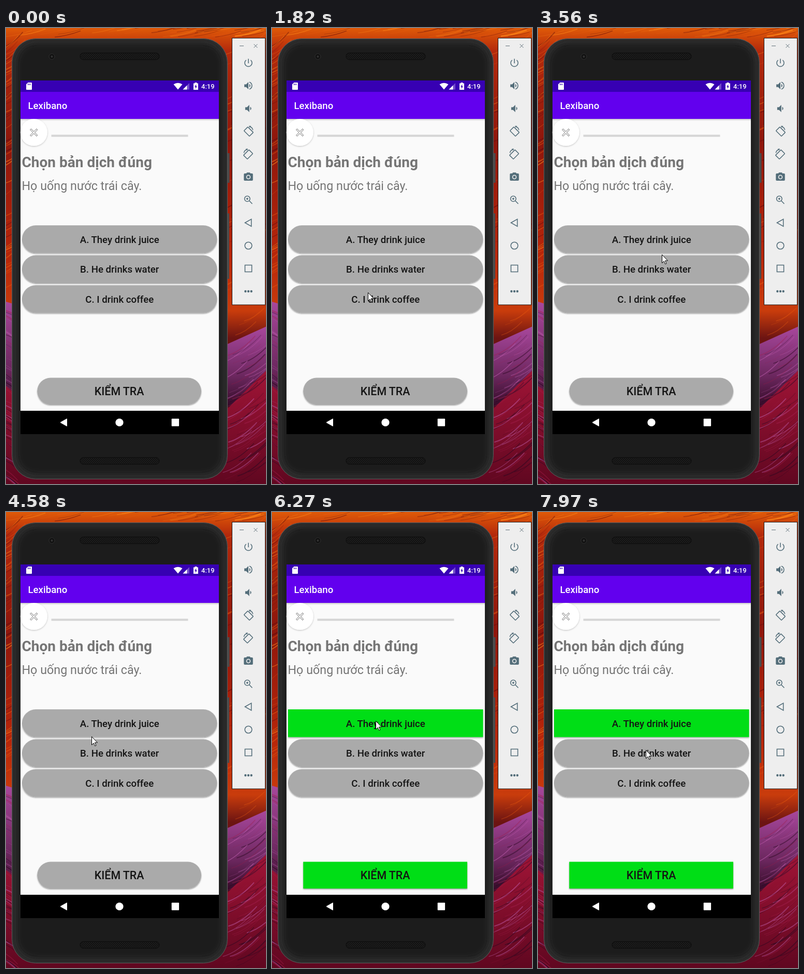
Write an HTML page that moves like this. It is 502x878 px and loops after 8000 ms.

```html
<!DOCTYPE html>
<html lang="vi">
<head>
<meta charset="utf-8">
<title>Quiz app</title>
<style>
html, body { margin: 0; width: 100%; height: 100%; overflow: hidden; background: #000; }
svg { display: block; width: 502px; height: 878px; }
text { font-family: Roboto, sans-serif; }
.mid { text-anchor: middle; font-weight: 500; fill: #141414; }
</style>
</head>
<body>
<svg viewBox="0 0 502 878" xmlns="http://www.w3.org/2000/svg">
  <defs>
    <linearGradient id="rock" x2="0" y2="1">
      <stop offset="0" stop-color="#e05a08"/><stop offset=".05" stop-color="#b42a0c"/>
      <stop offset=".25" stop-color="#8e160c"/><stop offset=".5" stop-color="#b8260a"/>
      <stop offset=".62" stop-color="#c93c0c"/><stop offset=".68" stop-color="#6c1412"/>
    </linearGradient>
    <linearGradient id="violet" x2="0" y2="1">
      <stop offset="0" stop-color="#a8479c"/><stop offset=".6" stop-color="#6d2860"/>
      <stop offset="1" stop-color="#330a26"/>
    </linearGradient>
    <linearGradient id="crimson" x2="0" y2="1">
      <stop offset="0" stop-color="#a01436"/><stop offset="1" stop-color="#600720"/>
    </linearGradient>
    <linearGradient id="bar" x2="0" y2="1">
      <stop offset="0" stop-opacity=".2"/><stop offset="1" stop-opacity="0"/>
    </linearGradient>
    <pattern id="mesh" width="4" height="4" patternUnits="userSpaceOnUse">
      <rect width="4" height="4" fill="#101010"/>
      <circle cx="1" cy="1" r=".8" fill="#303030"/><circle cx="3" cy="3" r=".8" fill="#303030"/>
    </pattern>
    <filter id="blur"><feGaussianBlur stdDeviation="5"/></filter>
    <filter id="lift" x="-10%" y="-20%" width="120%" height="150%">
      <feDropShadow dx="0" dy="1.6" stdDeviation="1.2" flood-opacity=".38"/>
    </filter>
    <filter id="float" x="-20%" y="-20%" width="140%" height="140%">
      <feDropShadow dx="0" dy="1" stdDeviation="1.6" flood-opacity=".25"/>
    </filter>
  </defs>

  <g id="wall">
    <rect width="502" height="878" fill="url(#rock)"/>
    <path d="M0 527L60 545V740H0z" fill="url(#violet)"/>
    <path d="M420 612L502 575V730H420z" fill="url(#violet)"/>
    <path d="M0 690L90 760H400L502 660V878H0z" fill="url(#crimson)"/>
    <g id="grain" fill="none"></g>
  </g>

  <g id="phone">
    <path d="M428 241h3.500v57H428zM428 357h3v126h-3z" fill="#4a4a4a"/>
    <rect x="11.500" y="20.500" width="416" height="848" rx="46" fill="#2e2e2e" stroke="#5c5c5c"/>
    <rect x="21" y="30" width="397" height="829" rx="38" fill="#1f1f1f" filter="url(#blur)"/>
    <rect x="143" y="48" width="153" height="13" rx="6.500" fill="url(#mesh)" stroke="#0b0b0b"/>
    <rect x="143" y="827" width="153" height="13" rx="6.500" fill="url(#mesh)" stroke="#0b0b0b"/>
    <circle cx="88.500" cy="55" r="5.500" fill="#121212" stroke="#303030"/>
    <circle cx="88.500" cy="55" r="2" fill="#333"/>
  </g>

  <g id="screen">
    <rect x="28" y="101" width="383" height="681" fill="#fafafa"/>
    <rect x="28" y="175" width="383" height="4" fill="url(#bar)"/>
    <rect x="28" y="101" width="383" height="22" fill="#3700b3"/>
    <rect x="28" y="123" width="383" height="52" fill="#6200ee"/>
    <rect x="28" y="737" width="383" height="45" fill="#000"/>
    <g fill="#fff">
      <path d="M42.500 105H49q1 0 1 1v12q0 1-1 1H40q-1 0-1-1V108.500z"/>
      <path d="M323.500 108.500Q332 103 340.500 108.500L332 118.500z"/>
      <path d="M354 106V118.500H341.500z" opacity=".3"/>
      <path d="M349.500 110.500V118.500H341.500z"/>
      <path d="M364.500 105h4v1.500H371V119H362V106.500h2.500z"/>
      <text x="377" y="117" font-size="13" font-weight="500">4:19</text>
      <text x="42.500" y="156" font-size="18.640" font-weight="500">Lexibano</text>
      <path d="M105 759.500L117.500 752.500V766.500z" stroke="#fff" stroke-linejoin="round"/>
      <circle cx="219" cy="759.500" r="7.600"/>
      <rect x="319.700" y="752.300" width="14.400" height="14.400" rx="1"/>
    </g>
    <path d="M42.500 107v3M44.700 107v3M46.900 107v3" stroke="#3700b3"/>
    <path d="M367.500 108.500L364 113.200H366L365.500 117L369 112.200H367z" fill="#3700b3"/>

    <circle cx="53.800" cy="201" r="26" fill="#fff" filter="url(#float)"/>
    <g fill="none" stroke-linecap="square">
      <path d="M48.500 196l10.500 10.500M59 196l-10.500 10.500" stroke="#888" stroke-width="3.400"/>
      <path d="M48.500 196l10.500 10.500M59 196l-10.500 10.500" stroke="#fff" stroke-width="1.700"/>
    </g>
    <rect x="87.500" y="205.500" width="264" height="4" fill="#d5d5d5"/>
    <g fill="#757575">
      <text x="30.500" y="268" font-size="28" font-weight="700">Chọn bản dịch đúng</text>
      <text x="30.500" y="312" font-size="23.300">Họ uống nước trái cây.</text>
    </g>
    <g id="buttons"></g>
  </g>

  <g id="tools">
    <rect x="436.500" y="19.500" width="64" height="513.500" fill="#eee" stroke="#1a1a1a"/>
    <path d="M451 34.500h8M478.500 31l7 7M485.500 31l-7 7" stroke="#62727a" fill="none"/>
  </g>

  <g id="pointer">
    <circle id="halo" r="12" fill="#ff0" fill-opacity=".47"/>
    <path d="M.5 .5V16.500L4.200 13L6.700 18.500L9 17.500L6.500 12H11.500z" fill="#fff" stroke="#000"/>
  </g>
</svg>

<script>
const NS = 'http://www.w3.org/2000/svg';
const $ = id => document.getElementById(id);
const LOOP = 8000, STEP = 82, CLICK = 5730, ANSWER = 6270;

function add(parent, tag, attrs, text) {
  const el = document.createElementNS(NS, tag);
  for (const k in attrs) el.setAttribute(k, attrs[k]);
  if (text) el.textContent = text;
  parent.appendChild(el);
  return el;
}

// Rock streaks on the wallpaper
let seed = 7;
const rnd = () => (seed = seed * 16807 % 2147483647) / 2147483647;
function streaks(x, y, w, h, dx, dy, colors) {
  for (let i = 0; i < 60; i++) {
    add($('grain'), 'path', {
      d: `M${x + rnd() * w} ${y + rnd() * h}q${dx / 2} ${dy / 5} ${dx} ${dy}`,
      stroke: colors[i % colors.length], 'stroke-width': .6 + rnd() * 1.6, opacity: .2 + rnd() * .35
    });
  }
}
const warm = ['#ff8a1a', '#5a0a0c', '#e65a10'], cool = ['#c060b0', '#2a0820', '#a01c48'];
streaks(0, 0, 500, 18, 50, -12, warm);
streaks(-20, 30, 20, 490, 40, -30, warm);
streaks(415, 20, 60, 580, 40, -26, warm);
streaks(-20, 540, 20, 330, 40, 28, cool);
streaks(410, 620, 60, 260, 55, -38, cool);

// Answer buttons: pill when idle, flat green when right
function button(x, y, w, h, size, label) {
  const box = add($('buttons'), 'rect', { x, y, width: w, height: h, filter: 'url(#lift)' });
  const base = Math.round(y + h / 2 + size * .38);
  add($('buttons'), 'text', { x: x + w / 2, y: base, 'font-size': size, class: 'mid' }, label);
  return right => {
    box.setAttribute('fill', right ? '#00de14' : '#aaa');
    box.setAttribute('rx', right ? 0 : h / 2);
  };
}
const answers = ['A. They drink juice', 'B. He drinks water', 'C. I drink coffee']
  .map((label, i) => button(31, 380 + 57.6 * i, 376.5, 53.3, 18.64, label));
const check = button(60.3, 673.5, 316.7, 51.5, 21.4, 'KIỂM TRA');
answers.forEach(paint => paint(false));

// Emulator toolbar, icons on a 24-unit grid
const INK = '#546e7a';
const line = d => `<path d="${d}"/>`;
const solid = d => `<path d="${d}" fill="${INK}" stroke="none"/>`;
const ring = (x, y, r) => `<circle cx="${x}" cy="${y}" r="${r}"/>`;
const mirror = html => `<g transform="matrix(-1 0 0 1 24 0)">${html}</g>`;
const rotate = '<rect x="4" y="6.500" width="17" height="12" rx="1" transform="rotate(45 12.500 12.500)"/>' +
  line('M14 1.500Q20.500 2.500 22 9') + solid('M13 0l5 0l-3 4z');
const icons = [
  line('M12 3v10M7 6a8 8 0 1 0 10 0'),
  solid('M3 9v6h4l5 5V4L7 9zM14 8v8q5-4 0-8z') + line('M14 4.300a8 8 0 0 1 0 15.400'),
  solid('M5 9v6h4l5 5V4L9 9zM16 8v8q5-4 0-8z'),
  rotate,
  mirror(rotate),
  solid('M9 2L7.200 4H4q-2 0-2 2v12q0 2 2 2h16q2 0 2-2V6q0-2-2-2h-3.200L15 2z') + `<g stroke="#eee">${ring(12, 12, 4)}</g>`,
  ring(9.5, 9.5, 6) + line('M14 14l6.500 6.500M7 9.500h5M9.500 7v5'),
  line('M4.500 12L18.500 4V20z'),
  ring(12, 12, 7.8),
  line('M4.500 4.500h15v15h-15z'),
  [5.5, 12, 18.5].map(x => `<g fill="${INK}">${ring(x, 12, 1.6)}</g>`).join('')
];
icons.forEach((html, i) => {
  add($('tools'), 'g', {
    transform: `translate(457.500 ${56.5 + 44 * i}) scale(.875)`,
    fill: 'none', stroke: INK, 'stroke-width': 1.8
  }).innerHTML = html;
});

// Pointer moves: start time, end time, points after the last resting place
const moves = [
  [500, 790, [152, 735], [163, 685]],
  [960, 1820, [170, 560], [185, 509]],
  [2060, 2860, [155, 525], [112, 460], [118, 399]],
  [3070, 3860, [165, 347], [243, 443], [241, 489]],
  [3940, 4720, [236, 410], [200, 367], [167, 434], [170, 402]],
  [4960, 5180, [200, 402]],
  [6580, 6880, [235, 425], [261, 441]],
  [7110, 7350, [268, 422]],
  [7500, 7970, [240, 424], [208, 458]]
];

// Smooth curve through evenly timed points, u from 0 to 1
function curve(pts, u) {
  const last = pts.length - 1, i = Math.min(last - 1, Math.floor(u * last)), f = u * last - i;
  const b = pts[i], c = pts[i + 1], a = pts[i - 1] || b, d = pts[i + 2] || c;
  return b.map((p, k) => {
    const m = (c[k] - a[k]) / 2, n = (d[k] - p) / 2, e = c[k] - p;
    if (last === 1) return Math.round(p + f * e);
    return Math.round(p + f * (m + f * (3 * e - 2 * m - n + f * (m + n - 2 * e))));
  });
}

function pointer(t) {
  let rest = [204, 824];
  for (const [t0, t1, ...pts] of moves) {
    if (t < t0) break;
    const gaps = Math.round((t1 - t0) / STEP);
    const step = Math.min(gaps, Math.floor((t - t0) / (t1 - t0) * gaps + 1e-6));
    rest = curve([rest, ...pts], (step + 1) / (gaps + 1));
  }
  return rest;
}

const show = (id, on) => $(id).style.display = on ? '' : 'none';

function draw(t) {
  answers[0](t >= ANSWER);
  check(t >= ANSWER);
  $('pointer').setAttribute('transform', `translate(${pointer(t)})`);
  show('pointer', t >= moves[0][0]);
  show('halo', t >= CLICK && t < CLICK + 80);
}

const start = performance.now();
function tick(now) {
  draw(Math.max(0, now - start) % LOOP);
  requestAnimationFrame(tick);
}
draw(0);
requestAnimationFrame(tick);
</script>
</body>
</html>
```
